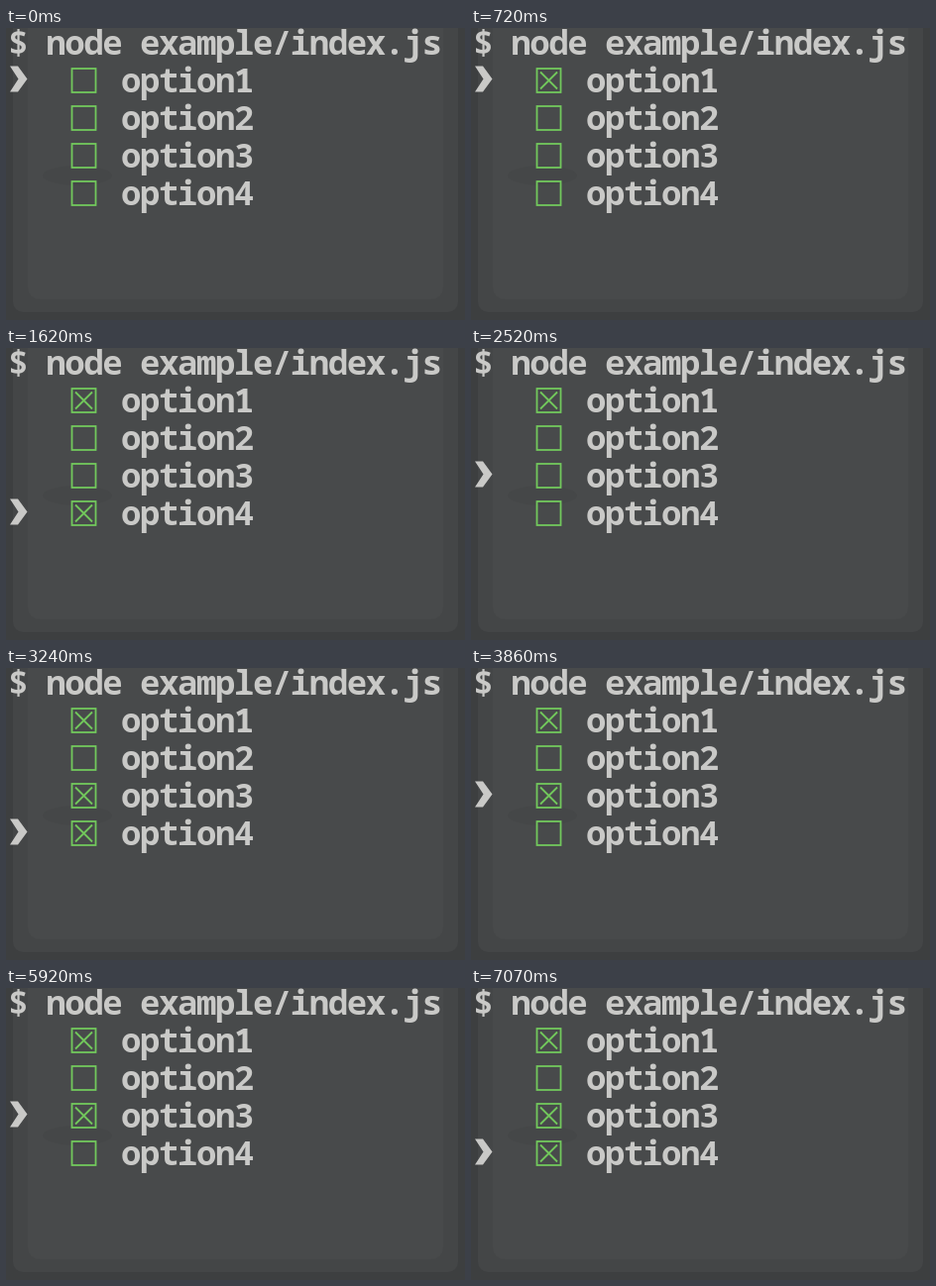
An HTML page for the animation above (8 s loop, 463 by 295 pixels).

```html
<!DOCTYPE html>
<html lang="en">
<head>
<meta charset="utf-8">
<title>Checkbox prompt</title>
<style>
  html, body { margin: 0; width: 100%; height: 100%; overflow: hidden; background: #3d3f40; }
  svg { display: block; width: 463px; height: 295px; }
  text {
    font: 600 34px "Noto Sans Mono", "DejaVu Sans Mono", monospace;
    letter-spacing: -1.43px;
    fill: #c9c9c7;
    white-space: pre;
  }
  .box { fill: none; stroke: #72c85c; stroke-width: 1.8; }
</style>
</head>
<body>
<svg viewBox="0 0 463 295">
  <rect width="463" height="295" fill="#3d3f40"/>
  <rect x="7" y="-30" width="449" height="317" rx="10" fill="#444647"/>
  <rect x="22" y="-30" width="419" height="304" rx="12" fill="#484a4b"/>
  <ellipse cx="72" cy="149" rx="35" ry="10" fill="#454748"/>
  <text x="2.3" y="27">$ node example/index.js</text>
  <g id="list"></g>
  <path id="cursor" fill="#c9c9c7" d="M4 38.5H12L21.5 51.5L12 64.5H4L12.5 51.5Z"/>
</svg>
<script>
const LOOP = 8000;
const PITCH = 38;
// [time, action, row]
const STEPS = [
  [720, "toggle", 0], [990, "move", 1], [1170, "move", 2], [1350, "move", 3],
  [1620, "toggle", 3], [2250, "toggle", 3], [2520, "move", 2], [2790, "toggle", 2],
  [3060, "move", 3], [3240, "toggle", 3], [3680, "toggle", 3], [3860, "move", 2],
  [4120, "move", 1], [4480, "toggle", 1], [5110, "toggle", 1], [5920, "move", 2],
  [6630, "move", 3], [7070, "toggle", 3]
];

const list = document.getElementById("list");
const cursor = document.getElementById("cursor");

function add(parent, tag, attrs) {
  const el = document.createElementNS("http://www.w3.org/2000/svg", tag);
  for (const key in attrs) el.setAttribute(key, attrs[key]);
  return parent.appendChild(el);
}

const marks = [0, 1, 2, 3].map(row => {
  const g = add(list, "g", { transform: `translate(0 ${row * PITCH})` });
  add(g, "rect", { class: "box", x: 66.5, y: 41, width: 24, height: 24 });
  add(g, "text", { x: 116.1, y: 65 }).textContent = "option" + (row + 1);
  return add(g, "path", { class: "box", d: "M70 44.5L87 61.5M87 44.5L70 61.5" });
});

function draw(time) {
  const checked = [false, false, false, false];
  let current = 0;
  for (const [at, action, row] of STEPS) {
    if (at > time) break;
    if (action === "move") current = row;
    else checked[row] = !checked[row];
  }
  cursor.setAttribute("transform", `translate(0 ${current * PITCH})`);
  marks.forEach((mark, i) => mark.setAttribute("visibility", checked[i] ? "visible" : "hidden"));
}

const start = performance.now();
function tick() {
  draw((performance.now() - start) % LOOP);
  requestAnimationFrame(tick);
}
tick();
</script>
</body>
</html>
```
